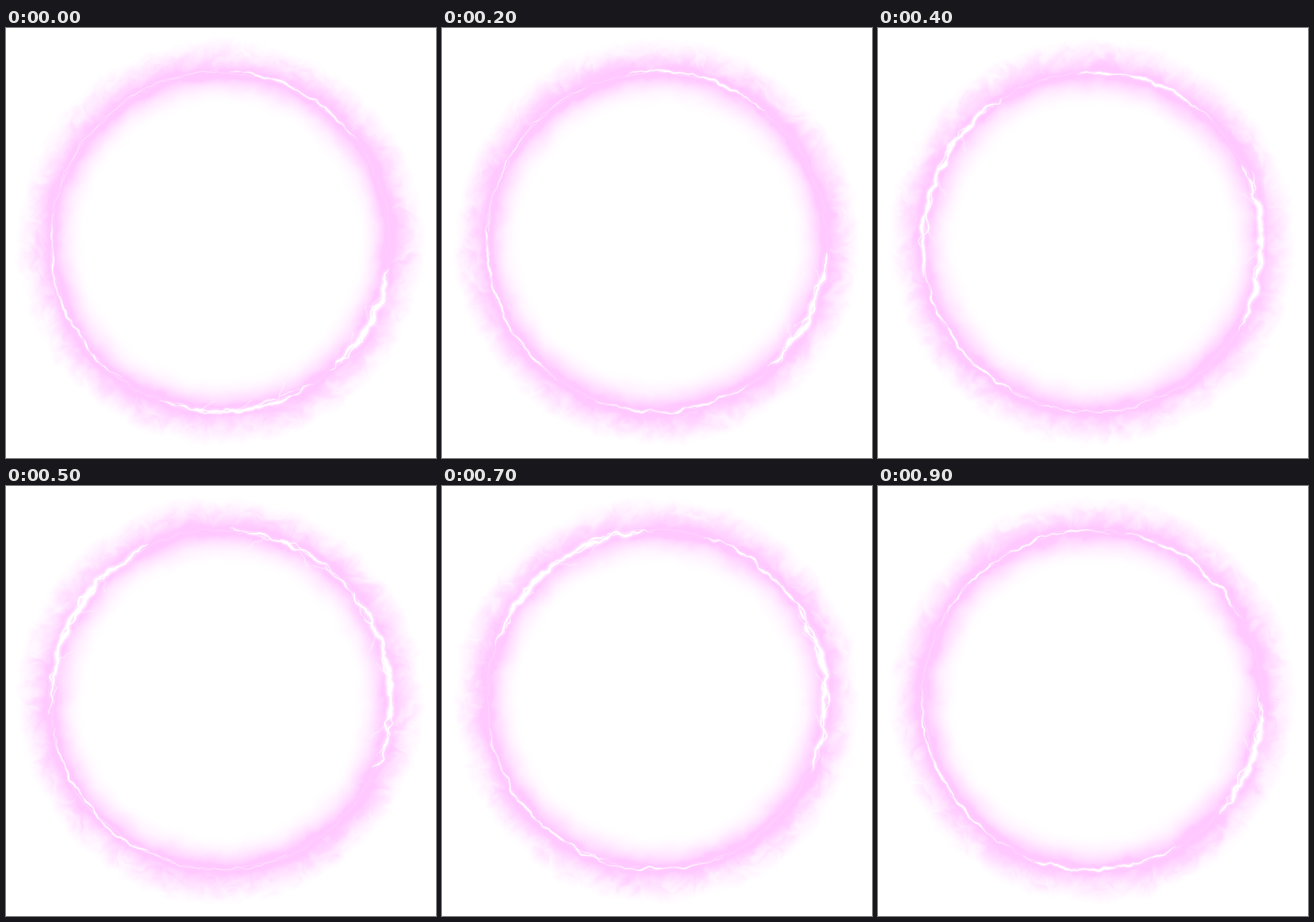
Animation of 748 by 748 pixels, one loop 1 s. Source, as an HTML page with a canvas:

```html
<!DOCTYPE html>
<html lang="en">
<head>
<meta charset="utf-8">
<title>Electric ring</title>
<style>
html, body { margin: 0; width: 100%; height: 100%; overflow: hidden; background: #fff; }
canvas { display: block; width: 748px; height: 748px; }
</style>
</head>
<body>
<canvas id="stage" width="748" height="748"></canvas>
<script>
const SIZE = 748, CX = 373, CY = 372, R = 295, STEPS = 10, STEP_MS = 100;
const ctx = document.getElementById('stage').getContext('2d');

const clamp = v => Math.max(0, Math.min(1, v));
// Cosine swing over the loop, highest at time `peak`
const swing = (t, peak, mid, amount) => mid + amount * Math.cos(2 * Math.PI * (t - peak));

// Five discharges slide along the ring and pulse; angles in degrees, clockwise from the right
const discharges = [
  t => ({ at: swing(t, .08, 11, 21), span: swing(t, .55, 26, 6), width: 7 }),
  t => ({ at: swing(t, .85, 222, 20), span: 35, width: swing(t, .58, 4.2, 3.8) }),
  t => ({ at: swing(t, .6, 89, 6), span: 27, width: swing(t, 0, 2.7, 1.5) }),
  t => ({ at: swing(t, .1, 148, 12), span: 32, width: 3 }),
  t => ({ at: swing(t, .75, 298, 14), span: 25, width: swing(t, .5, 3.6, .4) })
];

function hash(x, y, seed) {
  let h = Math.imul(x, 374761393) ^ Math.imul(y, 668265263) ^ Math.imul(seed + 1, 1274126177);
  h = Math.imul(h ^ h >>> 13, 1103515245);
  return ((h ^ h >>> 16) >>> 0) / 4294967296;
}

function noise(x, y, seed) {
  const ix = Math.floor(x), iy = Math.floor(y);
  let u = x - ix, v = y - iy;
  u *= u * (3 - 2 * u);
  v *= v * (3 - 2 * v);
  const a = hash(ix, iy, seed), b = hash(ix + 1, iy, seed);
  const c = hash(ix, iy + 1, seed), d = hash(ix + 1, iy + 1, seed);
  return a + (b - a) * u + (c - a + (a - b - c + d) * u) * v;
}

const fbm = (x, y, seed) =>
  (noise(x, y, seed) * 4 + noise(x * 2, y * 2, seed + 7) * 2 + noise(x * 4, y * 4, seed + 13)) / 7;

function drawHaze(g, step) {
  const image = g.createImageData(SIZE, SIZE), px = image.data.fill(255);
  const seed = step * 31;
  for (let y = 0; y < SIZE; y++) {
    for (let x = 0; x < SIZE; x++) {
      const r = Math.hypot(x - CX, y - CY);
      if (r < 222 || r > 364) continue;
      const n = fbm(x / 36, y / 36, seed);
      const wisp = fbm(x / 18 + 4 * n, y / 18 - 4 * n, seed + 5);
      const d = r + (n - .5) * 14 + (wisp - .5) * 10;
      const outside = d > R;
      const t = clamp(outside ? (d - 303) / 52 : (287 - d) / 52);
      const fade = Math.pow(1 - t, outside ? 1.25 : 1.8);
      const alpha = fade * (1 - Math.min(1, t * 2) * (wisp - .4));
      px[(y * SIZE + x) * 4 + 1] = 255 - 54 * clamp(alpha);
    }
  }
  g.putImageData(image, 0, 0);
}

function polar(deg, r) {
  const a = deg * Math.PI / 180;
  return [CX + r * Math.cos(a), CY + r * Math.sin(a)];
}

// Jagged strand whose width swells and tapers
function strand(g, from, to, width, rough, seed) {
  const radius = deg => R + (fbm(deg / 4, seed, seed) - .5) * rough * 2;
  let last = polar(from, radius(from));
  for (let deg = from + .5; deg <= to; deg += .5) {
    const point = polar(deg, radius(deg));
    const taper = Math.sqrt(Math.sin(Math.PI * (deg - from) / (to - from)));
    g.lineWidth = Math.max(.5, width * taper * (.35 + 1.1 * noise(deg / 2.5, seed, seed + 3)));
    g.beginPath();
    g.moveTo(...last);
    g.lineTo(...point);
    g.stroke();
    last = point;
  }
}

// Short branch that bends inwards from the ring
function fork(g, deg, seed) {
  const side = hash(seed, 1, 2) < .5 ? -1 : 1;
  const length = 10 + 18 * hash(seed, 2, 2);
  g.lineWidth = 1.4;
  g.beginPath();
  g.moveTo(...polar(deg, R));
  for (let i = 1; i <= 6; i++) {
    const bend = side * i * .9 + (hash(seed, i, 4) - .5) * 1.5;
    g.lineTo(...polar(deg + bend, R - length * i / 6));
  }
  g.stroke();
}

function drawBolts(g, step) {
  g.strokeStyle = g.shadowColor = '#fff';
  g.lineCap = g.lineJoin = 'round';
  g.globalAlpha = .25;
  strand(g, 0, 360, 1.2, 5, step + 50);
  discharges.forEach((discharge, i) => {
    const { at, span, width } = discharge(step / STEPS);
    const from = at - span, to = at + span, seed = step * 20 + i;
    g.shadowBlur = width;
    g.globalAlpha = Math.min(1, .45 + width * .12);
    strand(g, from, to, width * .75, 5 + width * .5, seed);
    if (width < 4) return;
    g.globalAlpha = .75;
    strand(g, from + 3, to - 4, width * .4, 6 + width, seed + 300);
    g.globalAlpha = .45;
    for (let k = 1; k < 4; k++) fork(g, from + (to - from) * k / 4, seed * 5 + k);
  });
}

const frames = Array.from({ length: STEPS }, (_, step) => {
  const canvas = document.createElement('canvas');
  canvas.width = canvas.height = SIZE;
  const g = canvas.getContext('2d');
  drawHaze(g, step);
  drawBolts(g, step);
  return canvas;
});

const start = performance.now();
function play() {
  const time = performance.now() - start;
  ctx.drawImage(frames[Math.floor(time / STEP_MS) % STEPS], 0, 0);
  requestAnimationFrame(play);
}
play();
</script>
</body>
</html>
```
